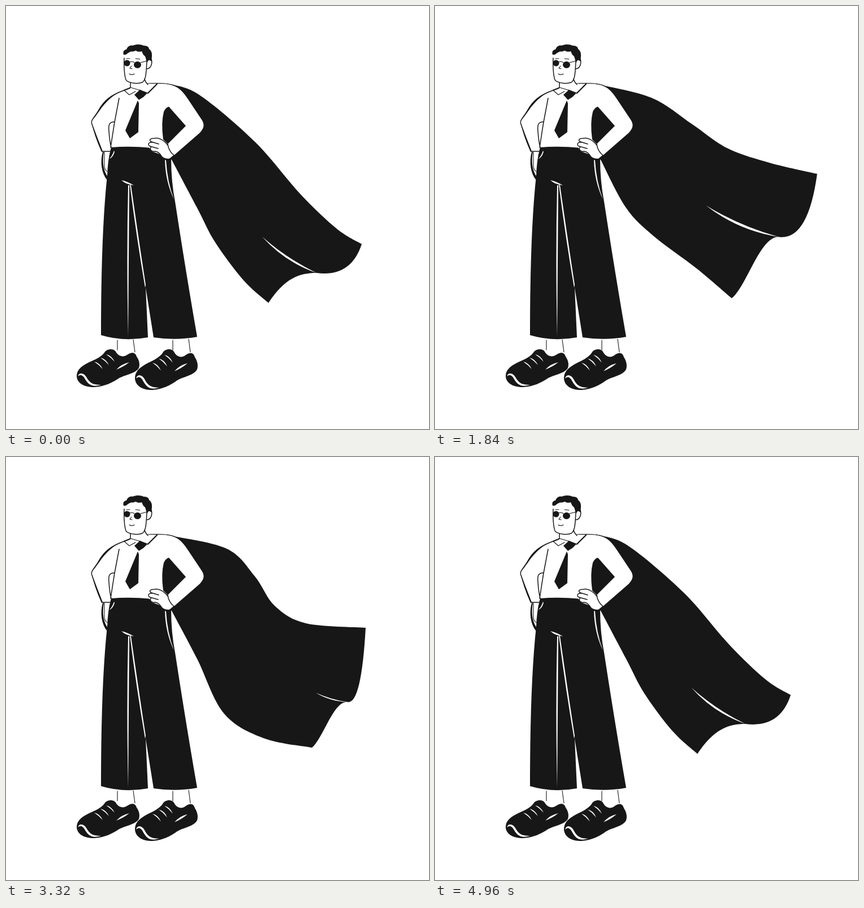
An HTML page that plays this animation: 748x748 px, repeating every 5000 ms.

```html
<!DOCTYPE html>
<html lang="en">
<head>
<meta charset="utf-8">
<title>Caped man</title>
<style>
  html, body { margin: 0; width: 100%; height: 100%; overflow: hidden; background: #fff; }
  svg { display: block; width: 100%; height: 100%; }
  .ink { fill: #171717; }
  .paper { fill: #fff; }
  .line { fill: none; stroke: #171717; stroke-width: 1.5; stroke-linecap: round; stroke-linejoin: round; }
  .thin { stroke-width: 1.1; }
  .bold { stroke-width: 2.2; }
</style>
</head>
<body>
<svg viewBox="0 0 748 748">
  <defs>
    <path id="lace" class="paper" d="M177 616Q187 618 192 629Q185 621 177 616Z"/>
    <g id="shoe">
      <path class="ink" d="M125 655C125 644 132 638 143 632C155 626 167 622 174 613C178 606 190 605 194 611C198 619 207 622 214 617C222 611 229 612 231 620C236 627 237 634 235 640C229 650 211 652 200 658C188 666 174 673 156 674C138 674 126 667 125 655Z"/>
      <use href="#lace"/>
      <use href="#lace" x="-10" y="6"/>
      <use href="#lace" x="-21" y="13"/>
      <path class="paper" d="M195 643Q204 633 218 630Q208 638 195 643Z"/>
      <path class="paper" d="M127 655C129 648 137 648 142 656C148 667 154 670 168 670C153 674 147 671 140 660C136 652 131 651 127 655Z"/>
    </g>
  </defs>

  <path id="cape" class="ink"/>
  <path id="fold" class="paper"/>

  <!-- far hand -->
  <path class="ink" d="M171 258C166 276 169 296 179 308L180 302C172 291 170 276 173 258Z"/>
  <path class="line thin" d="M174 258L174 284Q175 292 181 293"/>

  <!-- shirt -->
  <path class="paper" d="M220 145L208 150L200 162L186 250H260L297 264L343 224C351 215 351 209 346 201L322 165C308 144 300 138 268 137L245 135Z"/>
  <path class="line" d="M209 149C184 158 173 168 164 184C156 198 149 202 152 209Q160 234 170 257H184M200 163Q191 207 185 250M191 205C182 205 181 211 182 221Q183 238 186 250"/>
  <path class="ink" d="M205 150C184 158 174 167 164 184L154 201L169 180C180 166 190 157 205 150ZM152 208L171 257L169 258Q156 229 152 208Z"/>
  <path class="line thin" d="M250 137C278 136 292 137 301 142"/>
  <path class="ink" d="M288 178L318 212L286 244L278 236Q274 207 279 187Q282 180 288 178Z"/>

  <!-- trousers -->
  <path class="ink" d="M186 250Q220 247 258 251L292 270Q292 310 299 346Q318 470 338 585Q300 592 261 586L247 498L251 586Q208 594 168 582Q168 400 179 300Q180 270 186 250Z"/>
  <path class="paper" d="M216 317Q213 450 216 585Q217 450 218 317ZM219 316L221 317Q235 415 247 493L246 498Q231 410 219 316ZM204 308Q214 310 226 317Q213 316 204 308ZM281 272L283 273Q285 310 297 342Q282 311 281 272ZM191 256L192 258Q189 268 183 270Q188 265 191 256Z"/>

  <!-- near hand -->
  <path class="paper" d="M286 244L262 234L254 238L253 250L258 257L272 262Q278 271 290 270L297 264Z"/>
  <path class="line" d="M286 246C279 237 270 232 262 234C253 234 252 239 260 241L270 244M259 241C250 240 250 248 258 249L269 252M257 249C253 253 257 258 264 257Q270 258 274 264C278 271 285 272 290 270L297 264M286 244Q287 256 297 264"/>

  <!-- head -->
  <path class="paper" d="M210 88L209 112C210 127 211 133 219 135L220 144L237 148L251 138L246 128L249 111C257 110 258 101 257 94L248 82Z"/>
  <path class="line" d="M209 92C208 110 210 128 213 132C220 137 234 138 241 135C247 131 248 121 249 98M249 111C257 111 259 100 257 94M220 136L220 144M245 129Q246 134 251 139"/>
  <path class="ink" d="M208 86C206 81 209 77 213 77C215 71 220 69 224 70C232 67 239 68 243 70C250 70 253 73 253 76C260 81 258 89 257 98C253 94 251 96 250 100C247 97 248 91 245 88C242 86 242 84 240 80C235 82 232 80 229 79C224 82 221 79 218 82C214 83 214 87 208 86Z"/>
  <ellipse class="ink" cx="214" cy="101" rx="5.500" ry="5.500"/>
  <ellipse class="ink" cx="232.500" cy="104" rx="6.500" ry="6"/>
  <path class="line thin" d="M219 99Q223 97 227 100M238 100L250 97M213 93L219 93M229 93L237 94M222 106L219 110L223 111M218 120Q222 123 227 120"/>

  <!-- collar and tie -->
  <path class="line thin" d="M220 144L237 149L251 154M210 150L218 157L229 151"/>
  <path class="line bold" d="M209 149L219 145M267 138L251 154"/>
  <path class="ink" d="M237 148L250 154L243 161L235 166L227 157ZM233 167L235 172L234 223L219 234L211 220Z"/>

  <!-- feet -->
  <path class="line thin" d="M197 591L197 608M225 590L228 612M295 591L295 608M323 589L326 612"/>
  <use href="#shoe"/>
  <use href="#shoe" transform="matrix(1 0 0 1.075 103 -45.500)"/>
</svg>
<script>
  const LOOP = 5000;
  const SHOULDER = [285, 138], KNEE = [338, 357], HIP = [293, 272];

  // Key points: four along the top edge, corner, heel of the fold, tip, two along the lower edge, fold start
  const poses = [
    { at: 0, pts: [[340, 156], [440, 240], [520, 332], [585, 394], [629, 421], [549, 472], [464, 525], [420, 485], [370, 418], [453, 408]] },
    { at: 1320, pts: [[390, 158], [455, 204], [505, 267], [565, 309], [670, 320], [603, 428], [513, 525], [455, 483], [385, 418], [470, 373]] },
    { at: 2400, pts: [[375, 167], [455, 215], [530, 235], [620, 243], [682, 272], [612, 387], [537, 508], [470, 443], [390, 396], [489, 331]] },
    { at: 3320, pts: [[390, 162], [440, 211], [475, 263], [530, 294], [636, 302], [603, 433], [541, 514], [455, 497], [385, 453], [548, 417]] },
    { at: 4240, pts: [[350, 165], [440, 248], [545, 296], [600, 373], [631, 403], [545, 467], [471, 516], [437, 459], [395, 405], [478, 363]] }
  ];
  poses.push({ ...poses[0], at: 4967 });

  const capePath = document.getElementById('cape');
  const foldPath = document.getElementById('fold');
  const lerp = (a, b, p) => a + (b - a) * p;

  // Smooth curve through the points, continuing from the first one
  function spline(points) {
    const at = i => points[Math.max(0, Math.min(points.length - 1, i))];
    const handle = (i, side) => at(i).map((v, k) => v + side * (at(i + 1)[k] - at(i - 1)[k]) / 6);
    return points.slice(1).map((p, i) => `C${handle(i, 1)} ${handle(i + 1, -1)} ${p}`).join('');
  }

  // The hem bulges below the heel, then sweeps to the tip; steeper sweeps give a rounder tip
  function hemline([cx, cy], [hx, hy], [tx, ty]) {
    const dx = hx - tx, dy = ty - hy;
    const lift = (1.3 - 0.85 * dy / dx) * dy;
    return `Q${lerp(cx, hx, 0.24)} ${hy + 8} ${hx} ${hy}` +
      `C${hx - 0.4 * dx} ${hy} ${tx + 0.32 * dx} ${ty - lift} ${tx} ${ty}`;
  }

  // Thin white crescent between two points
  function crescent([ax, ay], [bx, by]) {
    const side = bend => `${(ax + bx) / 2 - (by - ay) * bend} ${(ay + by) / 2 + (bx - ax) * bend}`;
    return `M${ax} ${ay}Q${side(0.13)} ${bx} ${by}Q${side(0.07)} ${ax} ${ay}Z`;
  }

  function draw(time) {
    const t = Math.min(time % LOOP, poses[5].at);
    const i = Math.max(1, poses.findIndex(pose => pose.at >= t));
    const from = poses[i - 1], to = poses[i];
    const p = (t - from.at) / (to.at - from.at);
    const pts = from.pts.map((pt, n) => pt.map((v, k) => lerp(v, to.pts[n][k], p)));
    const [corner, heel, tip, low1, low2, crease] = pts.slice(4);

    capePath.setAttribute('d', `M${SHOULDER}` + spline([SHOULDER, ...pts.slice(0, 5)]) +
      hemline(corner, heel, tip) + spline([tip, low1, low2, KNEE, HIP]) + 'L270 250Z');
    foldPath.setAttribute('d', crescent(crease, heel));
  }

  const start = performance.now();
  function tick() {
    draw(performance.now() - start);
    requestAnimationFrame(tick);
  }
  tick();
</script>
</body>
</html>
```
